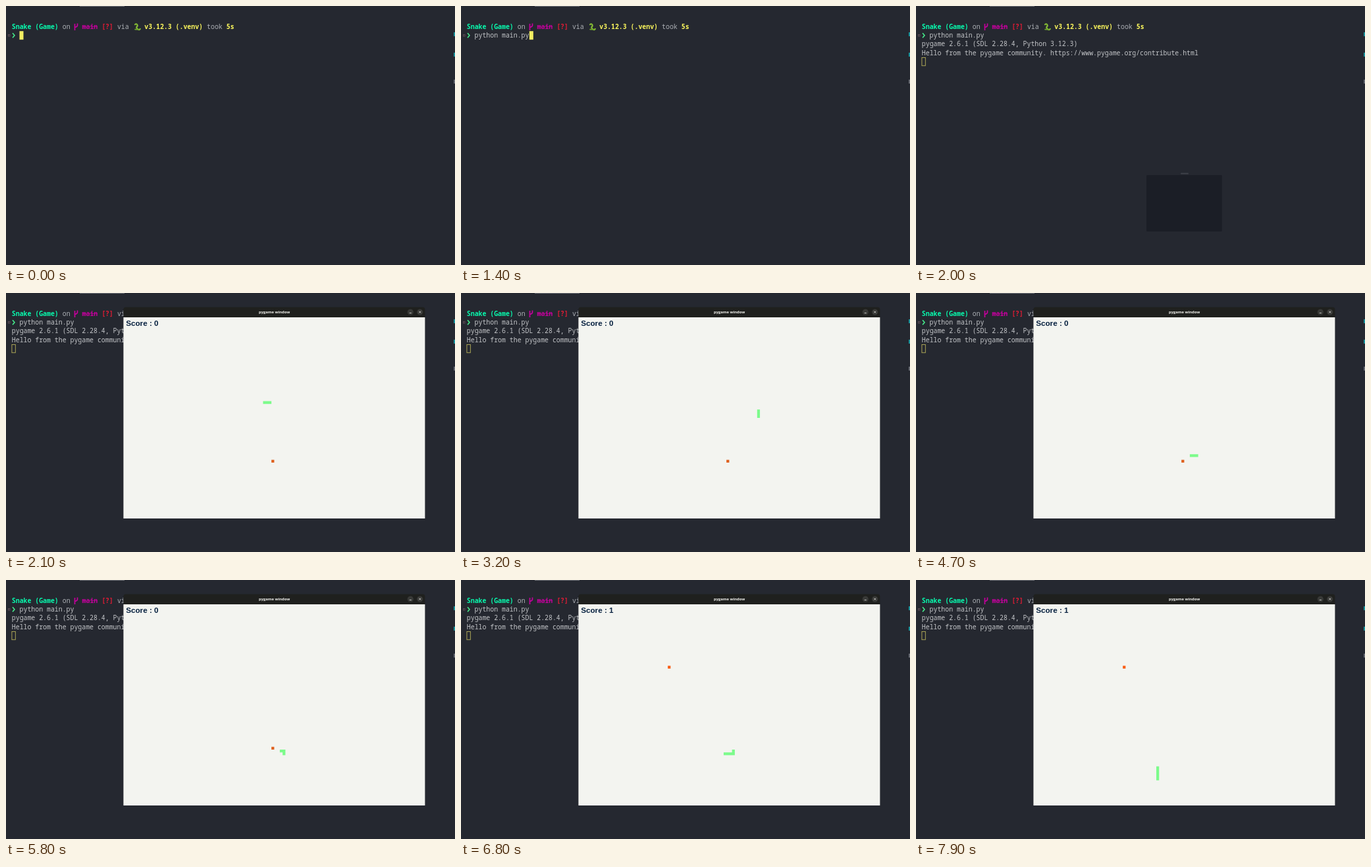
An HTML page that plays this animation: 682x394 px, repeating every 8 s.

```html
<!DOCTYPE html>
<html lang="en">
<head>
<meta charset="utf-8">
<title>Snake in the terminal</title>
<style>
  html, body { margin: 0; width: 100%; height: 100%; overflow: hidden; background: #252830; }
  svg { display: block; width: 100%; height: 100%; }
  text { white-space: pre; }
  .term { font: 9.87px "Noto Sans Mono", "DejaVu Sans Mono", monospace; fill: #c3c5c8; }
  .dim { fill: #adb0b5; }
  .b { font-weight: 700; }
  .title { font: 700 5.85px "Open Sans", "Noto Sans", sans-serif; fill: #f2f2ee; text-anchor: middle; }
  .score { font: 700 11.7px "Liberation Sans", Arial, sans-serif; fill: #06203f; }
</style>
</head>
<body>
<svg viewBox="0 0 682 394">
  <rect width="682" height="394" fill="#252830"/>
  <rect x="112" width="68" height="1" fill="#6a6d73"/>
  <g fill="#178f98">
    <rect x="680" y="40" width="2" height="6"/>
    <rect x="680" y="71" width="2" height="6"/>
    <rect x="680" y="112" width="2" height="6" fill="#656870"/>
  </g>

  <g class="term">
    <g class="b">
      <text x="8.8" y="34.6" fill="#08fbae">Snake (Game)</text>
      <text x="115.6" y="34.6" fill="#c4009c">main</text>
      <text x="145.2" y="34.6" fill="#e31c35">[?]</text>
      <text x="210.3" y="34.6" fill="#fbf65c">v3.12.3 (.venv)</text>
      <text x="334.8" y="34.6" fill="#fbf65c">5s</text>
    </g>
    <text class="dim" x="85.8" y="34.6">on</text>
    <text class="dim" x="168.9" y="34.6">via</text>
    <text class="dim" x="305.1" y="34.6">took</text>
    <path d="M104.5 27v10M108.5 26.5v3q0 2-4 3" fill="none" stroke="#c4009c" stroke-width="1.7"/>
    <path d="M116 31.5h23" stroke="#c4009c" stroke-width=".7"/>
    <path d="M196 28.2q2-2 3.2 0t-.4 3.2 1 3.6 4-.2" fill="none" stroke="#86bd35" stroke-width="2.1" stroke-linecap="round"/>
    <path d="M196 35.6h6" stroke="#6fa52c" stroke-width="1.6" stroke-linecap="round"/>
    <rect x="3.4" y="43.4" width="2.6" height="2.6" fill="none" stroke="#66525a" stroke-width=".8"/>
    <path d="M10 41.3l3 3.5-3 3.5" fill="none" stroke="#46f58f" stroke-width="1.5"/>
    <text data-from="1400" x="20.6" y="48">python main.py</text>
    <g data-from="1900">
      <text x="8.8" y="61.2">pygame 2.6.1 (SDL 2.28.4, Python 3.12.3)</text>
      <text x="8.8" y="74.5">Hello from the pygame community. https://www.pygame.org/contribute.html</text>
    </g>
  </g>

  <g fill="#f3ee62">
    <rect data-to="1400" x="20.5" y="38.2" width="6" height="13"/>
    <rect data-from="1400" data-to="1700" x="103.8" y="38.2" width="6" height="13"/>
    <rect data-from="1700" data-to="1900" x="8.6" y="51.5" width="6" height="13"/>
    <rect data-from="1900" data-to="2000" x="8.6" y="78" width="6" height="13"/>
  </g>
  <rect data-from="2000" x="8.9" y="78.4" width="5.4" height="12.4" fill="none" stroke="#b9b25a" stroke-width=".9"/>

  <g data-from="2000" data-to="2100">
    <rect x="350" y="257.3" width="114.7" height="85.7" rx="1" fill="#1b1e26"/>
    <rect x="402" y="253.8" width="12" height="2.2" rx="1" fill="#3a3d45"/>
  </g>

  <g data-from="2100">
    <path d="M178.4 37.5V25q0-3.5 3.5-3.5h451q3.5 0 3.5 3.5v12.5z" fill="#1f201e"/>
    <text class="title" x="407.7" y="31">pygame window</text>
    <g fill="#383937">
      <circle cx="614.3" cy="29" r="4.6"/>
      <circle cx="628.7" cy="29" r="4.6"/>
    </g>
    <path d="M612.8 30.4h3M627.3 27.6l2.8 2.8m0-2.8l-2.8 2.8" stroke="#e8e8e4" stroke-width=".8"/>
    <rect x="178.4" y="37" width="458" height="306" fill="#f3f4f0"/>
    <text class="score" x="182.2" y="50.2" id="score">Score : 0</text>
    <g transform="translate(178.4 37) scale(4.241 4.25)">
      <rect id="food" width="1" height="1"/>
      <path id="snake" fill="#7cfb8b"/>
    </g>
  </g>
</svg>
<script>
  const LOOP = 8000;
  const EAT = 61; // move on which the score changes
  const corners = [[50, 30], [64, 30], [64, 49], [52, 49], [52, 54], [57, 54], [57, 52], [55, 52],
                   [55, 51], [53, 51], [53, 49], [55, 49], [55, 53], [44, 53], [44, 66]];
  // [time in ms, moves made]
  const pace = [[2100, 0], [3200, 17], [4300, 34], [4700, 39], [5200, 47],
                [5800, 56], [6100, 60], [7000, 74], [7900, 88], [8000, 89.5]];

  const trail = [corners[0]];
  for (const [cx, cy] of corners.slice(1)) {
    let [x, y] = trail.at(-1);
    while (x !== cx || y !== cy) {
      x += Math.sign(cx - x);
      y += Math.sign(cy - y);
      trail.push([x, y]);
    }
  }

  const byId = id => document.getElementById(id);
  const score = byId("score"), food = byId("food"), snake = byId("snake");
  const timed = [...document.querySelectorAll("[data-from], [data-to]")].map(el => ({
    el, from: +(el.dataset.from || 0), to: +(el.dataset.to || LOOP)
  }));

  function movesAt(t) {
    const i = pace.findIndex(([time]) => time > t);
    if (i < 1) return 0;
    const [t0, m0] = pace[i - 1], [t1, m1] = pace[i];
    return Math.floor(m0 + (m1 - m0) * (t - t0) / (t1 - t0) + 0.5);
  }

  function draw(t) {
    for (const { el, from, to } of timed) {
      el.style.display = t >= from && t < to ? "" : "none";
    }
    const moves = movesAt(t);
    const eaten = moves >= EAT;
    const length = 3 + Math.max(0, Math.min(2, moves - EAT + 1));
    const head = moves + 2;
    snake.setAttribute("d", trail.slice(head - length + 1, head + 1)
      .map(([x, y]) => `M${x} ${y}h1v1h-1z`).join(""));
    food.setAttribute("x", eaten ? 32 : 53);
    food.setAttribute("y", eaten ? 22 : 51);
    food.setAttribute("fill", eaten ? "#f95d14" : "#df6120");
    score.textContent = `Score : ${eaten ? 1 : 0}`;
  }

  const start = performance.now();
  function tick() {
    draw((performance.now() - start) % LOOP);
    requestAnimationFrame(tick);
  }
  tick();
</script>
</body>
</html>
```
